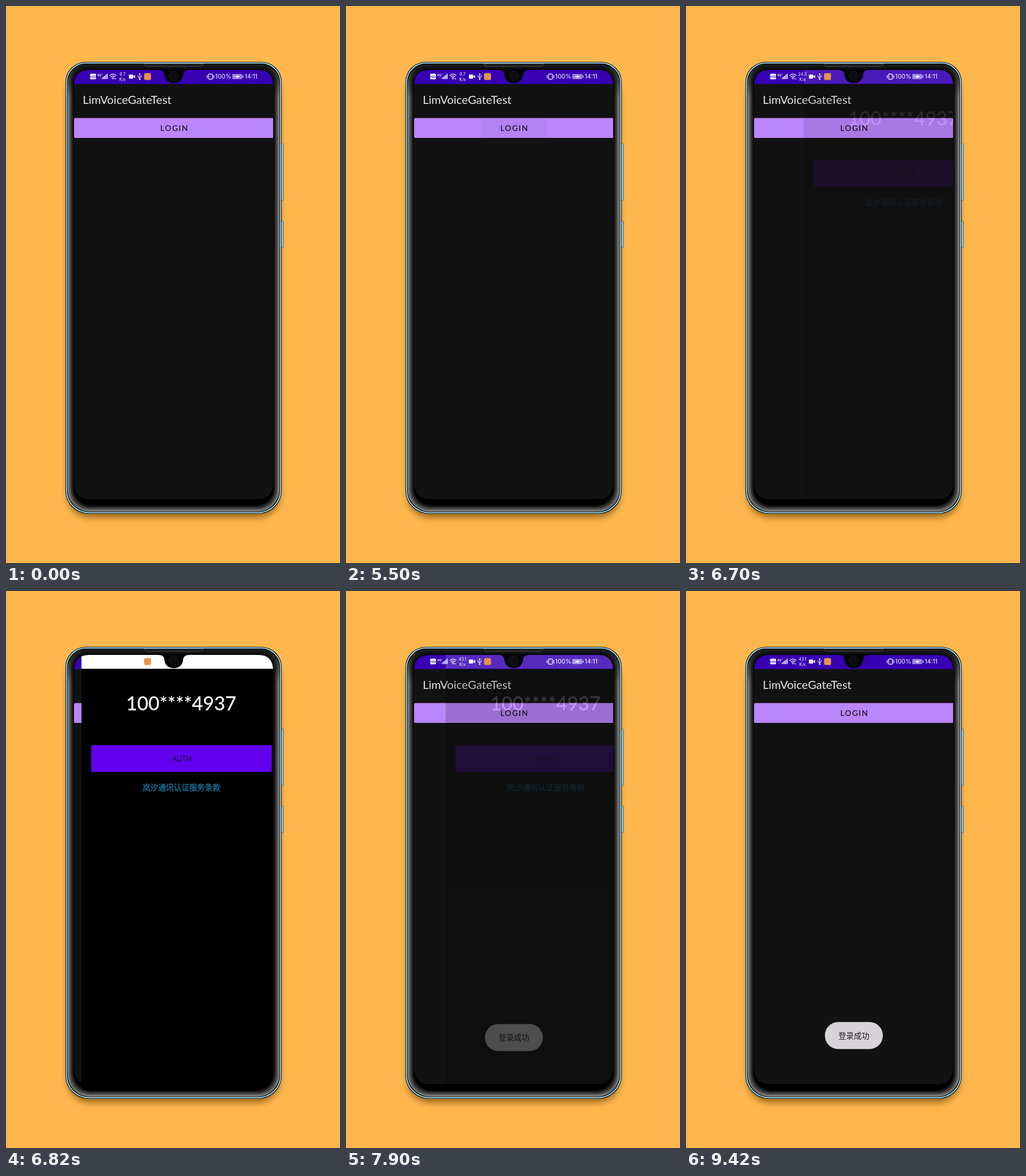
An HTML page that plays this animation: 579 px wide and 967 px high, repeating every 9.54 s.

```html
<!DOCTYPE html>
<html lang="en">
<head>
<meta charset="utf-8">
<title>Phone login</title>
<style>
  html, body { margin: 0; width: 100%; height: 100%; overflow: hidden; background: #ffb74d; }
  svg { display: block; width: 579px; height: 967px; }
  text { font-family: Lato, "Open Sans", sans-serif; }
  .cjk { font-family: "Noto Sans CJK SC", "Noto Sans CJK", "Noto Sans", sans-serif; }
  .status text { font-family: Inter, Roboto, sans-serif; }
  .mid { text-anchor: middle; }
</style>
</head>
<body>
<svg viewBox="0 0 579 967" xmlns="http://www.w3.org/2000/svg">
  <defs>
    <clipPath id="screen"><path d="M118 135Q120 111 144 111H438Q461 111 463 135V836Q461 867 430 867H151Q120 867 118 836Z"/></clipPath>
    <clipPath id="page"><path d="M118 135Q120 111 144 111H438Q461 111 463 135V830Q461 856 437 856H144Q120 856 118 830Z"/></clipPath>
    <clipPath id="key"><rect x="118" y="194.5" width="345.5" height="34.5" rx="2"/></clipPath>
    <linearGradient id="fade" x1="0" y1="98" x2="0" y2="160" gradientUnits="userSpaceOnUse">
      <stop offset="0" stop-color="#222"/><stop offset=".2" stop-color="#555"/><stop offset="1" stop-color="#fff"/>
    </linearGradient>
    <mask id="glow" maskUnits="userSpaceOnUse" x="100" y="95" width="382" height="790">
      <rect x="100" y="95" width="382" height="790" fill="url(#fade)"/>
    </mask>
    <mask id="hd" maskUnits="userSpaceOnUse" x="144" y="115" width="14" height="15">
      <rect x="145.8" y="117.6" width="10.2" height="9.6" rx="1.6" fill="#fff"/>
      <text x="150.9" y="124.7" class="mid" font-size="6.3" font-weight="700">HD</text>
    </mask>
    <filter id="soft" x="-20%" y="-10%" width="140%" height="120%"><feGaussianBlur stdDeviation="6"/></filter>
  </defs>

  <rect width="579" height="967" fill="#ffb74d"/>
  <rect x="106" y="114" width="369" height="774" rx="38" fill="#5e3800" opacity=".62" filter="url(#soft)"/>

  <g id="keys" fill="#a5d8ea" stroke="#24404d" stroke-width=".8"></g>
  <g id="body"></g>
  <g id="bezel" fill="none" mask="url(#glow)"></g>
  <path d="M239 100.5H342L339 104.8H242Z" fill="#17181a" stroke="#55585c" stroke-width=".8"/>

  <g clip-path="url(#screen)">
    <rect x="118" y="111" width="346" height="756" fill="#000"/>
    <g clip-path="url(#page)">
      <rect x="118" y="111" width="346" height="746" fill="#121212"/>
      <rect x="118" y="111" width="346" height="24.5" fill="#3700b3"/>
      <text x="133" y="170" font-size="20" fill="#e6e6e6">LimVoiceGateTest</text>
      <g clip-path="url(#key)">
        <rect x="118" y="194" width="346" height="36" fill="#bb86fc"/>
        <circle id="ripple" cx="291" cy="212" r="0"/>
      </g>
      <text x="292" y="217" class="mid" font-size="13.6" font-weight="500" letter-spacing="1.5" fill="#120d1c">LOGIN</text>
    </g>
    <g id="auth">
      <rect x="118" y="111" width="346" height="756" fill="#000"/>
      <rect x="118" y="111" width="346" height="24" fill="#fff"/>
      <text x="291" y="206.5" class="mid" font-size="33.2" fill="#fff" stroke="#fff" stroke-width=".3">100****4937</text>
      <rect x="135" y="267.5" width="313" height="46.5" fill="#6200ee"/>
      <text x="292" y="296" class="mid" font-size="12.6" fill="#14002e">AUTH</text>
      <text x="291.5" y="345.5" class="mid cjk" font-size="13.5" fill="#1f7aa6" stroke="#1f7aa6" stroke-width=".3">岚汐通讯认证服务条款</text>
    </g>
    <g id="toast">
      <rect x="240.8" y="748.3" width="100.4" height="47" rx="23.2" fill="#d6d4d6"/>
      <text x="291" y="777" class="mid cjk" font-size="13.4" fill="#1c1c1c">登录成功</text>
    </g>
  </g>

  <g class="status" fill="#fff">
    <rect x="145" y="117" width="12" height="11" mask="url(#hd)"/>
    <text x="158" y="121.8" font-size="5.4" font-weight="600">4G⁺</text>
    <path d="M161 126V123.5M163.5 123.5V126" stroke="#fff" stroke-width=".8" opacity=".4"/>
    <g id="bars"></g>
    <g fill="none" stroke="#fff" stroke-width="1.2">
      <path d="M179.8 120.8Q185.5 115.6 191.2 120.8M181.6 123.1Q185.5 119.6 189.4 123.1M183.4 125.2Q185.5 123.4 187.6 125.2"/>
      <path d="M188 126.5H191" stroke-width="1"/>
      <rect x="351.2" y="118.1" width="6.6" height="9" rx="1"/>
      <path d="M348.7 120V125.4M360.2 120V125.4"/>
      <path d="M231.8 118V127M228.8 120.5V123L231.8 124.8L234.8 122.5V120.2" stroke-width="1"/>
    </g>
    <circle cx="185.5" cy="126.4" r=".9"/>
    <circle cx="231.8" cy="127" r="1.3"/>
    <path d="M230.3 119L231.8 116.6L233.3 119Z"/>
    <text id="rate" x="202" y="120.7" class="mid" font-size="7.2"></text>
    <text x="202" y="129.7" class="mid" font-size="7.2">K/s</text>
    <rect x="213" y="119" width="7.4" height="7" rx="1.2"/>
    <path d="M220 122.5L223.8 119.4V125.6Z"/>
    <rect x="239.4" y="116.6" width="12" height="12" rx="2.8" fill="#e3944c"/>
    <text x="362.6" y="126.4" font-size="10.6">100%</text>
    <rect x="392.2" y="118" width="17" height="9" rx="1.4" opacity=".5"/>
    <rect x="410" y="120.4" width="1.3" height="4.2"/>
    <path d="M396 122.6L400.6 121.4L401.2 119.4L402.2 121.5L406 122.4L402.2 123.5L401.4 125.6L400.4 123.7Z"/>
    <text x="413.8" y="126.4" font-size="10.3">14:11</text>
  </g>

  <path d="M264 110H318V111Q308 111 307.3 118C306.3 129 299.5 134 290.8 134C282 134 275.3 129 274.3 118Q273.6 111 264 111Z" fill="#020203"/>
  <circle cx="290.5" cy="121" r="8.2" fill="#0b0b0e" stroke="#1d1d22"/>
  <circle cx="290.5" cy="121" r="4.3" fill="#08080c" stroke="#25252d" stroke-dasharray="3 1.5"/>
  <circle cx="290.5" cy="121" r="1.6" fill="#14141c"/>
</svg>
<script>
const LOOP = 9540;
const $ = id => document.getElementById(id);
const clamp = v => Math.min(1, Math.max(0, v));
const span = (t, from, to) => clamp((t - from) / (to - from));

function add(parent, tag, attrs) {
  const el = document.createElementNS("http://www.w3.org/2000/svg", tag);
  for (const name in attrs) el.setAttribute(name, attrs[name]);
  parent.append(el);
}

// Phone outline moved inwards, rounder at the bottom than at the top
function outline(inset) {
  const l = 103 + inset, r = 478 - inset, t = 97 + inset, b = 881.5 - inset;
  const p = 35 - inset * 0.6, q = 40 - inset * 0.6;
  return `M${l} ${t + p}A${p} ${p} 0 0 1 ${l + p} ${t}H${r - p}A${p} ${p} 0 0 1 ${r} ${t + p}` +
    `V${b - q}A${q} ${q} 0 0 1 ${r - q} ${b}H${l + q}A${q} ${q} 0 0 1 ${l} ${b - q}Z`;
}

// cubic-bezier(.4, 0, .2, 1)
function ease(x) {
  let lo = 0, hi = 1, s = x;
  for (let i = 0; i < 20; i++) {
    s = (lo + hi) / 2;
    const r = 1 - s;
    if (1.2 * r * r * s + 0.6 * r * s * s + s ** 3 < x) lo = s; else hi = s;
  }
  return s * s * (3 - 2 * s);
}

function build() {
  add($("body"), "path", { d: outline(0), fill: "#0a1a24" });
  add($("body"), "path", { d: outline(1.9), fill: "#020303", stroke: "#a9e4f7", "stroke-width": 1.7 });
  for (let i = 0; i < 22; i++) {
    const p = i / 21, v = Math.round(12 + 145 * (1 - p) ** 1.2);
    add($("bezel"), "path", { d: outline(4.2 + i * 0.49), stroke: `rgb(${v},${v},${v})`, "stroke-width": 0.8 });
  }
  for (let i = 0; i < 5; i++) {
    const h = 2.4 + i * 1.7;
    add($("bars"), "rect", { x: 166.2 + i * 2.15, y: 126.8 - h, width: 1.4, height: h });
  }
  for (const [y, h] of [[239.4, 98], [373.4, 46]]) {
    add($("keys"), "rect", { x: 475, y, width: 5.6, height: h, rx: 1.2 });
  }
}

function render(time) {
  const t = Math.floor((time - 20) / 40) * 40 + 20;

  const press = span(t, 5460, 5680);
  $("ripple").setAttribute("r", t < 5500 ? 0 : 30 + 150 * press);
  $("ripple").setAttribute("opacity", 0.17 * press * (1 - span(t, 5840, 5980)));

  const leaving = t >= 7740;
  const shift = 104 * (leaving ? ease(span(t, 7786, 8102)) : 1 - ease(span(t, 6630, 6946)));
  const alpha = leaving ? 1 - span(t, 7790, 7922) : span(t, 6689, 6800);
  $("auth").setAttribute("transform", `translate(${shift.toFixed(2)} 0)`);
  $("auth").setAttribute("opacity", alpha);

  const rise = span(t, 7850, 8010);
  $("toast").setAttribute("opacity", rise);
  $("toast").setAttribute("transform", `translate(0 ${(5 * (1 - rise)).toFixed(2)})`);

  $("rate").textContent = t < 6140 ? "9.7" : t < 7300 ? "24.3" : "43.1";
}

build();
render(0);
const start = performance.now();
function tick() {
  render((performance.now() - start) % LOOP);
  requestAnimationFrame(tick);
}
requestAnimationFrame(tick);
</script>
</body>
</html>
```
